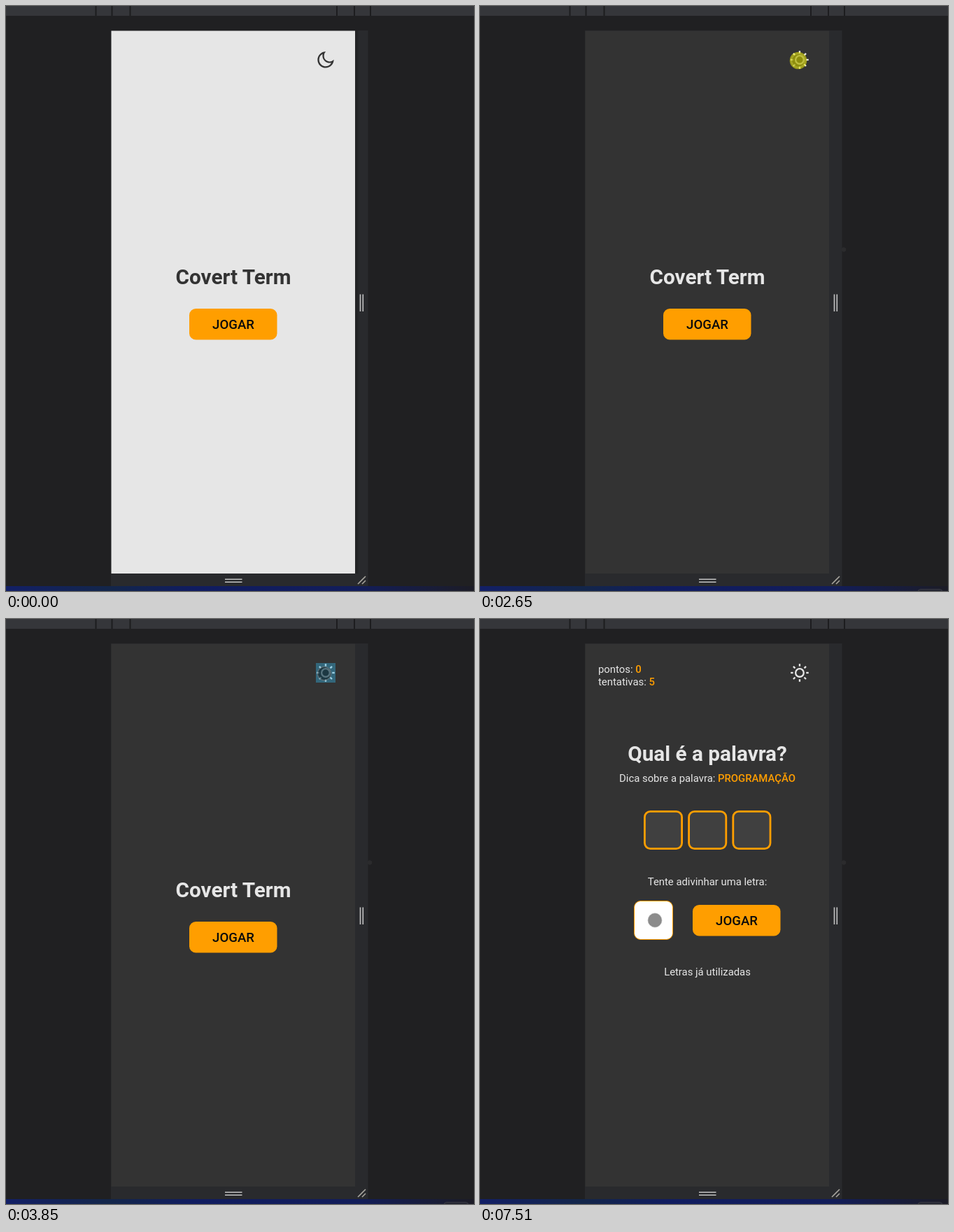
These frames come from a looping animation (669 by 837 pixels, 8 s). An HTML page:

```html
<!DOCTYPE html>
<html lang="pt">
<head>
<meta charset="utf-8">
<title>Word game</title>
<style>
html, body { margin: 0; width: 100%; height: 100%; overflow: hidden; background: #202022; }
svg { display: block; width: 669px; height: 837px; }
text { font-family: Roboto, sans-serif; font-size: 14.87px; fill: var(--ink); }
.mid { text-anchor: middle; }
.title { font-size: 29.74px; font-weight: 700; }
.label { font-size: 18.6px; font-weight: 500; fill: #0b0b0b; }
.hot { fill: #ff9e00; font-weight: 500; }
.hide { display: none; }
</style>
</head>
<body>
<svg viewBox="0 0 669 837">
  <defs>
    <linearGradient id="strip">
      <stop offset="0" stop-color="#121f66"/>
      <stop offset=".22" stop-color="#13264a"/>
      <stop offset=".4" stop-color="#101c60"/>
      <stop offset=".75" stop-color="#121d5a"/>
      <stop offset="1" stop-color="#1c1c26"/>
    </linearGradient>
  </defs>
  <rect width="669" height="837" fill="#202022"/>
  <rect width="669" height="14" fill="#35363a"/>
  <path d="M128.5 0V14M151.5 0V14M177.5 0V14M473 0V14M498 0V14M521 0V14" stroke="#1d1d1f" stroke-width="2"/>
  <rect y="830" width="669" height="7" fill="url(#strip)"/>
  <rect x="150" y="35" width="367.5" height="795" fill="#292a2d"/>
  <rect id="band" x="499" y="35" width="4.5" height="777" fill="#232426"/>
  <g stroke="#c3c3c3" stroke-width="1.6">
    <path d="M506.5 412.5V437M510.3 412.5V437M313 820.3H337.5M313 824.3H337.5"/>
    <path d="M503 827L514 816M509 827L514 822" stroke="#a5a39c"/>
  </g>
  <circle id="spot" cx="520" cy="348.5" r="3.2" fill="#2b2b2d"/>
  <rect id="chip" x="626" y="834.5" width="35" height="12" rx="4" fill="#222430" stroke="#3a3b45"/>
  <rect id="page" x="150.5" y="35.5" width="348.5" height="776.5"/>

  <g id="home">
    <text class="mid title" x="325" y="398">Covert Term</text>
    <rect x="262" y="433" width="125.5" height="44.5" rx="9.3" fill="#ff9e00"/>
    <text class="mid label" x="325" y="462">JOGAR</text>
  </g>

  <g id="game">
    <text x="169" y="77">pontos: <tspan class="hot">0</tspan></text>
    <text x="169" y="94.8">tentativas: <tspan class="hot">5</tspan></text>
    <text class="mid title" x="325" y="202.5">Qual é a palavra?</text>
    <text class="mid" x="325" y="233">Dica sobre a palavra: <tspan class="hot">PROGRAMAÇÃO</tspan></text>
    <g id="slots" fill="#404040" stroke="#ff9e00" stroke-width="2.8"></g>
    <text class="mid" x="325" y="381">Tente adivinhar uma letra:</text>
    <rect x="220.5" y="403.5" width="55" height="55" rx="9" fill="#fff" stroke="#ff9e00"/>
    <rect x="304" y="409" width="125.5" height="44.5" rx="9.3" fill="#ff9e00"/>
    <text class="mid label" x="367" y="437.7">JOGAR</text>
    <text class="mid" x="325" y="510">Letras já utilizadas</text>
  </g>

  <g transform="translate(443 63) scale(1.1625)">
    <path id="moon" fill="#333" fill-rule="evenodd" d="M10 7A7 7 0 0 0 22 11.9A10 10 0 1 1 12.1 2A7 7 0 0 0 10 7ZM4 12A8 8 0 0 0 19.06 15.76A9 9 0 0 1 8.24 4.94A8 8 0 0 0 4 12Z"/>
    <g id="sun" transform="translate(12 12)" fill="none" stroke="#e6e6e6" stroke-width="2"><circle r="5"/></g>
  </g>
  <rect id="flash" x="443" y="63" width="28" height="28" fill="#33b5e5"/>
  <g id="cursor">
    <circle r="9.7" fill="#000" fill-opacity=".45" stroke="#888" stroke-opacity=".5" stroke-width="1.4"/>
    <circle id="press" r="12.3" fill="#ff0" fill-opacity=".5"/>
  </g>
</svg>
<script>
const LOOP = 8000;
const $ = id => document.getElementById(id);
const show = (id, on) => $(id).classList.toggle('hide', !on);
const within = (t, [a, b]) => t >= a && t < b;

function add(parent, tag, attrs) {
  const el = document.createElementNS('http://www.w3.org/2000/svg', tag);
  for (const k in attrs) el.setAttribute(k, attrs[k]);
  $(parent).append(el);
}
for (let i = 0; i < 3; i++)
  add('slots', 'rect', { x: 235.4 + i * 63.2, y: 275.4, width: 53.2, height: 53.2, rx: 8 });
for (let i = 0; i < 8; i++)
  add('sun', 'path', { d: 'M0 -11V-8', transform: `rotate(${i * 45})` });

// start, end, number of steps, points along the way
const moves = [
  [250, 1010, 10, [[548, 780], [520, 348], [437, 97]]],
  [1090, 1260, 3, [[437, 97], [453, 97], [454, 85], [455, 78]]],
  [4080, 4510, 6, [[455, 78], [400, 270], [329, 461]]],
  [5770, 5940, 3, [[329, 461], [301, 428], [285, 400], [269, 378]]],
  [6100, 6600, 7, [[269, 378], [260, 282]]],
  [6930, 7510, 8, [[260, 282], [268, 350], [250, 431]]]
];
const presses = [[1420, 1500], [2650, 2750], [3760, 3850], [4680, 4770]];
// full highlight, dimmed highlight, gone
const flashes = [[1500, 1660, 1750], [2750, 2830, 2930], [3850, 3920, 4000]];

function along(points, p) {
  const s = p * (points.length - 1);
  const i = Math.min(Math.floor(s), points.length - 2);
  return points[i].map((v, k) => v + (points[i + 1][k] - v) * (s - i));
}

function cursorAt(t) {
  const move = moves.filter(m => t >= m[0]).pop();
  if (!move) return null;
  const [a, b, n, points] = move;
  const step = Math.min(n, 1 + Math.floor((t - a) / (b - a) * (n - 1) + 1e-6));
  return along(points, step / n);
}

function draw(t) {
  const dark = within(t, [1500, 2750]) || t >= 3850;
  const playing = t >= 4770;
  document.body.style.setProperty('--ink', dark ? '#e6e6e6' : '#333');
  $('page').setAttribute('fill', dark ? '#333' : '#e6e6e6');
  show('band', !dark);
  show('moon', !dark);
  show('sun', dark);
  show('home', !playing);
  show('game', playing);
  show('spot', t >= 670);
  show('chip', t >= 1420);

  const flash = flashes.find(([a, , c]) => within(t, [a, c]));
  $('flash').setAttribute('opacity', flash ? (t < flash[1] ? 0.4 : 0.2) : 0);

  const at = cursorAt(t);
  show('cursor', at);
  if (at) $('cursor').setAttribute('transform', `translate(${at})`);
  show('press', presses.some(p => within(t, p)));
}

const start = performance.now();
function tick() {
  draw((performance.now() - start) % LOOP);
  requestAnimationFrame(tick);
}
tick();
</script>
</body>
</html>
```
